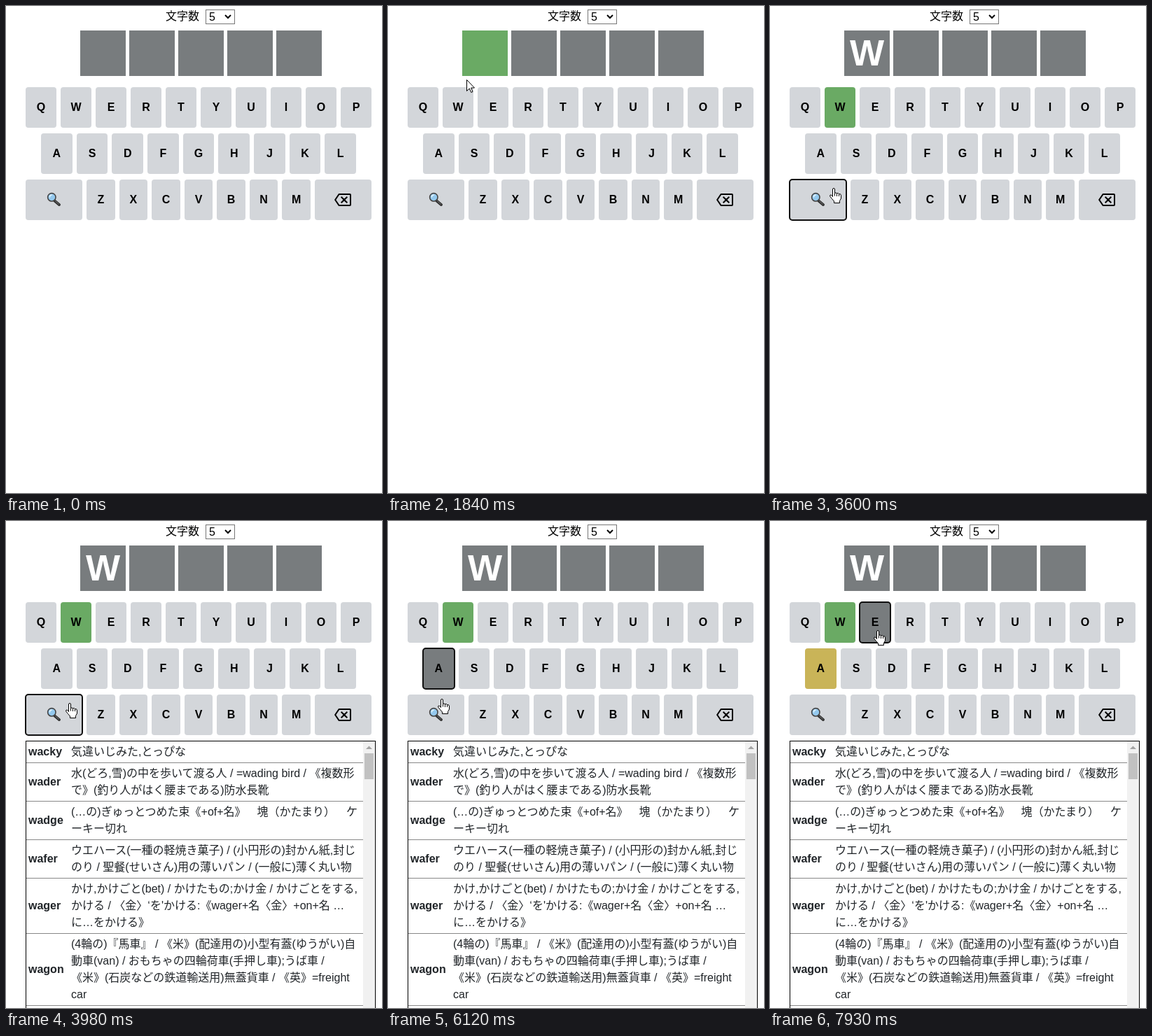
Write an HTML page that moves like this. It is 537 px wide and 696 px high and loops after 8000 ms.

```html
<!DOCTYPE html>
<html lang="ja">
<head>
<meta charset="utf-8">
<style>
html, body { margin: 0; width: 100%; height: 100%; overflow: hidden; background: #fff; }
body { position: relative; font: 16px/24px "Liberation Sans", "Noto Sans CJK JP", sans-serif; color: #000; text-spacing-trim: space-all; }
body > *, .list > *, svg { position: absolute; box-sizing: border-box; }
.label { left: 228px; top: 3px; white-space: nowrap; }
.select { left: 285px; top: 5px; width: 42px; height: 21px; border: 1px solid #767676; padding-left: 4px; line-height: 20px; }
.tile { top: 35px; width: 65px; height: 65px; background: #787c7e; color: #fff; font: bold 52px/65px "Liberation Sans", sans-serif; text-align: center; }
.key { height: 58px; border-radius: 4px; background: #d3d6da; font-weight: bold; line-height: 57px; text-align: center; outline-offset: -1px; }
.list { left: 28px; top: 314px; width: 500px; height: 400px; border: 1px solid #000; color: #212529; }
.row { left: 0; width: 481px; border-bottom: 1px solid #888; white-space: pre; }
.row b { position: absolute; left: 3px; top: 50%; margin-top: -12px; }
.row span { position: absolute; left: 64px; top: 3px; }
.track { left: 481px; top: 0; width: 17px; height: 400px; background: #f1f1f1; }
.thumb { left: 483px; top: 17px; width: 13px; height: 37px; background: #c1c1c1; }
#cursor { left: 0; top: 0; width: 20px; height: 24px; overflow: visible; fill: #fff; stroke: #000; }
</style>
</head>
<body>
<div class="label">文字数</div>
<div class="select">5<svg style="left:26px;top:5px" width="10" height="9" fill="none" stroke="#000" stroke-width="2"><path d="M1 2l4 4 4-4"/></svg></div>
<div class="list" id="list">
  <div class="track"></div>
  <div class="thumb"></div>
  <svg style="left:485px;top:6px" width="9" height="5" fill="#a3a3a3"><path d="M0 5L4.500 .5 9 5z"/></svg>
</div>
<svg id="cursor">
  <path id="arrow" d="M.5.5V16.500L4.300 12.900 6.800 18.500 9 17.500 6.600 12H11.500z"/>
  <g id="hand" transform="translate(-5 0)">
    <path d="M4.500 12.500V2a1.500 1.500 0 0 1 3 0V7.500q1.500-1.300 3 .2 1.600-.9 3 .8 2.800-.6 3 2.500V15L14.500 18.500V21.500H6.500V19L3.500 15.500.7 12q-.6-2 1.300-2 1.200.2 2.500 2.500z"/>
    <path d="M7.500 7.500v4M10.500 8v4M13.500 9v3" fill="none"/>
  </g>
</svg>
<script>
const LOOP = 8000, GREEN = '#6aaa64', YELLOW = '#c9b458', GREY = '#787c7e', LIGHT = '#d3d6da';
const $ = id => document.getElementById(id);
const list = $('list'), cursor = $('cursor');

function add(parent, className, style, html = '') {
  const el = document.createElement('div');
  el.className = className;
  Object.assign(el.style, style);
  el.innerHTML = html;
  parent.insertBefore(el, parent === document.body ? cursor : null);
  return el;
}

const tiles = [0, 1, 2, 3, 4].map(i => add(document.body, 'tile', { left: 106 + 70 * i + 'px' }));

const keys = {};
function addKey(name, x, y, w, html = name) {
  const el = add(document.body, 'key', { left: x + 'px', top: y + 'px', width: w + 'px' }, html);
  keys[name] = { el, x, y, w };
}
function addRow(letters, x, y, w) {
  [...letters].forEach((c, i) => addKey(c, x + i * (w + 6), y, w));
}
addRow('QWERTYUIOP', 28, 116, 44);
addRow('ASDFGHJKL', 50, 182, 44.667);
addRow('ZXCVBNM', 115, 248, 40.571);
addKey('search', 28, 248, 81, `<svg style="left:30px;top:18px" width="21" height="21" stroke-linecap="round">
  <path d="M11.500 12.500L18 18" stroke="#333" stroke-width="4"/><path d="M12.500 12.800L17.500 17.300" stroke="#777" stroke-width="1"/>
  <circle cx="7.300" cy="7.300" r="5.700" fill="#94c9ee" stroke="#444" stroke-width="1.600"/>
  <path d="M4.500 7a3 3 0 0 1 3-3" fill="none" stroke="#e2f3ff" stroke-width="1.500"/></svg>`);
addKey('back', 441, 248, 81, `<svg style="left:28px;top:17px" width="24" height="24" fill="none" stroke="#000" stroke-width="2">
  <path d="M7 4H22a1 1 0 0 1 1 1V19a1 1 0 0 1-1 1H7a1 1 0 0 1-.8-.5L1.200 12l5-7.500A1 1 0 0 1 7 4zM9.700 7.700l8.600 8.600M18.300 7.700l-8.600 8.600"/></svg>`);

const entries = [
  ['wacky', '気違いじみた,とっぴな'],
  ['wader', '水(どろ,雪)の中を歩いて渡る人 / =wading bird / 《複数形\nで》(釣り人がはく腰まである)防水長靴'],
  ['wadge', '(…の)ぎゅっとつめた束《+of+名》　塊（かたまり）　ケ\nーキー切れ'],
  ['wafer', 'ウエハース(一種の軽焼き菓子) / (小円形の)封かん紙,封じ\nのり / 聖餐(せいさん)用の薄いパン / (一般に)薄く丸い物'],
  ['wager', "かけ,かけごと(bet) / かけたもの;かけ金 / かけごとをする,\nかける / 〈金〉‘を'かける:《wager+名〈金〉+on+名 …\nに…をかける》"],
  ['wagon', '(4輪の)『馬車』 / 《米》(配達用の)小型有蓋(ゆうがい)自\n動車(van) / おもちゃの四輪荷車(手押し車);うば車 /\n《米》(石炭などの鉄道輸送用)無蓋貨車 / 《英》=freight\ncar']
];
let rowTop = 0;
for (const [word, text] of entries) {
  const height = text.split('\n').length * 24 + 7;
  add(list, 'row', { top: rowTop + 'px', height: height + 'px' }, `<b>${word}</b><span>${text}</span>`);
  rowTop += height;
}

// Pointer moves: start, step time, step count, end x, end y
const moves = [
  [100, 50, 1, 466, 687], [380, 44, 11, 158, 145], [870, 50, 4, 120, 63],
  [1710, 48, 6, 104, 147], [3090, 50, 1, 103, 160], [3140, 50, 4, 90, 260],
  [4810, 53, 4, 90, 206], [5790, 50, 3, 72, 286], [6070, 50, 4, 80, 221],
  [7090, 50, 1, 82, 220], [7140, 45, 5, 223, 172], [7550, 50, 5, 153, 156]
];
function pointerAt(t) {
  let x = 466, y = 687;
  for (const [start, step, count, endX, endY] of moves) {
    if (t < start) break;
    const p = Math.min(count, Math.floor((t - start) / step) + 1) / count;
    const e = p * p * (3 - 2 * p);
    x += (endX - x) * e;
    y += (endY - y) * e;
  }
  return [Math.round(x), Math.round(y)];
}

// Latest value of a [time, value] list
const at = (t, steps) => steps.reduce((value, [start, next]) => t >= start ? next : value, undefined);

function render(t) {
  const colors = {
    W: at(t, [[0, LIGHT], [2680, GREEN]]),
    A: at(t, [[0, LIGHT], [5330, GREY], [6500, YELLOW]]),
    E: at(t, [[0, LIGHT], [7930, GREY]])
  };
  const focus = at(t, [[2040, 'W'], [3600, 'search'], [5200, 'A'], [7830, 'E']]);
  const [x, y] = pointerAt(t);
  let overKey = false;
  for (const [name, key] of Object.entries(keys)) {
    key.el.style.background = colors[name] || LIGHT;
    key.el.style.outline = name === focus ? '2px solid #101010' : 'none';
    overKey ||= x >= key.x && x < key.x + key.w && y >= key.y && y < key.y + 58;
  }
  tiles[0].style.background = at(t, [[0, GREY], [1430, GREEN], [2680, GREY]]);
  tiles[0].textContent = t >= 2680 ? 'W' : '';
  list.style.display = t >= 3980 ? '' : 'none';
  cursor.style.display = t >= 100 ? '' : 'none';
  cursor.style.transform = `translate(${x}px, ${y}px)`;
  $('arrow').style.display = overKey ? 'none' : '';
  $('hand').style.display = overKey ? '' : 'none';
}

const origin = performance.now();
function tick() {
  render((performance.now() - origin) % LOOP);
  requestAnimationFrame(tick);
}
tick();
</script>
</body>
</html>
```
